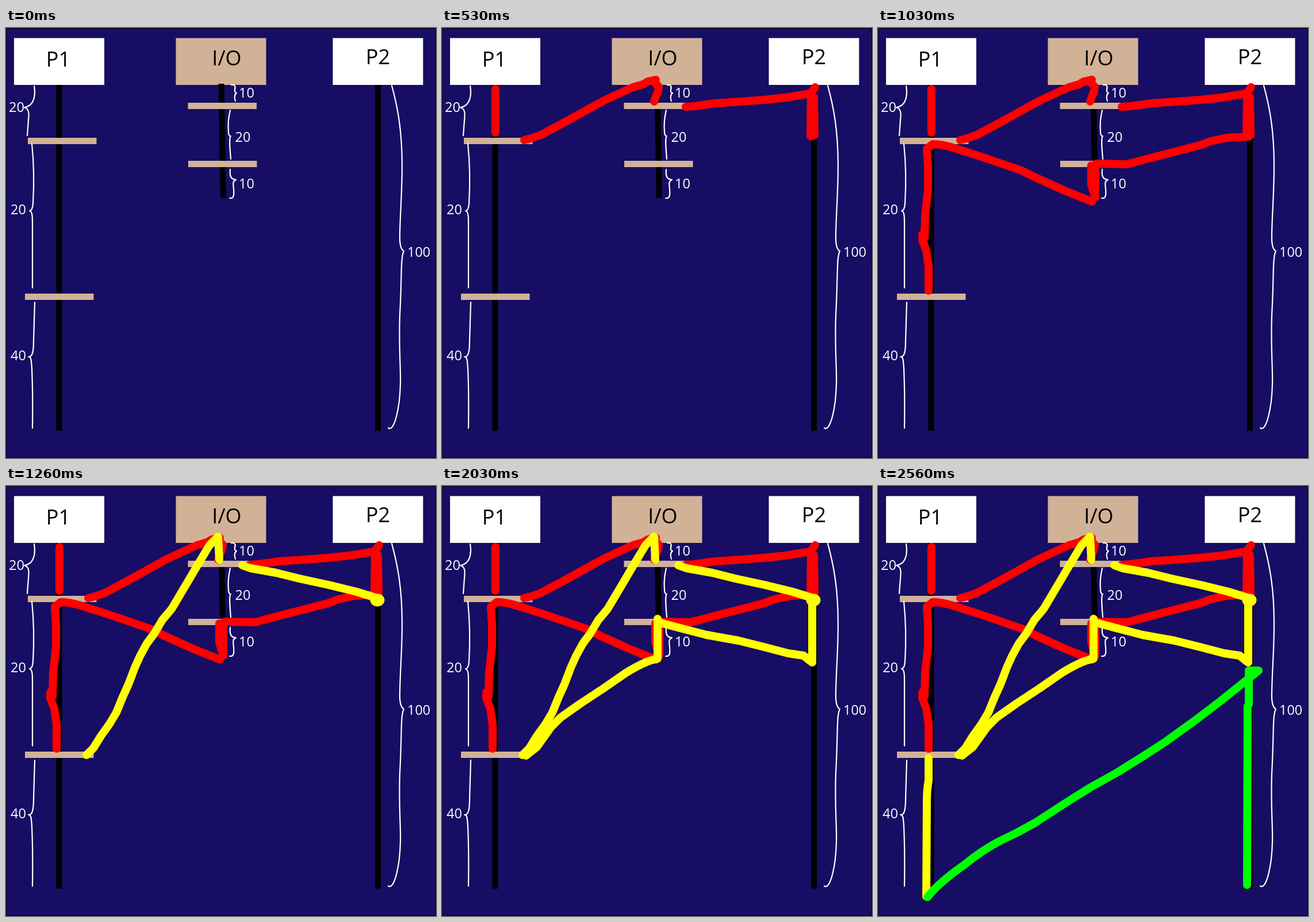
An HTML page with a canvas that plays this animation: 748x748 px, repeating every 2.96 s.

```html
<!DOCTYPE html>
<html lang="en">
<head>
<meta charset="utf-8">
<title>Process timeline</title>
<style>
  html, body { margin: 0; width: 100%; height: 100%; overflow: hidden; background: #170d64; }
  canvas { display: block; width: 748px; height: 748px; }
</style>
</head>
<body>
<canvas id="stage" width="748" height="748"></canvas>
<script>
const ctx = document.getElementById('stage').getContext('2d');
const LOOP = 2960;
const NAVY = '#170d64', TAN = '#d1b297';
const RED = '#ff0000', YELLOW = '#ffff00', GREEN = '#00ff00';
const FONT = '"Open Sans", "Noto Sans", sans-serif';

const boxes = [
  { x: 14, fill: '#fff', label: 'P1', cx: 91, base: 67 },
  { x: 295.5, fill: TAN, label: 'I/O', cx: 384, base: 65 },
  { x: 568.5, fill: '#fff', label: 'P2', cx: 647, base: 63 },
];

const bars = [[38, 191], [33, 462], [316.5, 130], [317, 231]];

const lifelines = ['M92.5 99V700.5', 'M374.5 97L378 295.5', 'M647 99V700.5'];

const braces = [
  'M49 101C52 119 48 136 32 138C41 141 40 150 39 160L37 187',
  'M45 201C49 240 49 270 47 305Q46 318 41 318C46 319 46 329 46 340V452',
  'M50 477L48 545C48 562 46 573 39 572C44 571 44 580 45 592Q47 640 46 696',
  'M392 99C398 98 400 102 398 107Q397 112 401 113C397 116 397 121 399 127',
  'M390 143C386 160 386 170 387 180Q387 188 391 188C388 190 389 205 391 228',
  'M390 246C389 258 391 263 400 264C394 267 395 270 396 280C397 292 396 297 389 296',
  'M671 100C682 140 689 180 689 240C689 290 685 330 685 365Q685 384 692 388C686 400 689 430 685 500C683 560 687 590 686 620C685 660 676 702 665 696',
];

const notes = [
  ['20', 5, 145.5], ['20', 8, 324], ['40', 8, 578], ['10', 405, 120.5],
  ['20', 398.5, 197.5], ['10', 405, 279], ['100', 698, 398],
];

// Brush strokes in drawing order: appearance time, colour, path.
const strokes = [
  [130, RED, 'M93 106V182'],
  [260, RED, 'M143 195L155 192 172 186 215 163 280 127 332 103 350 98 358 93 372 90'],
  [260, RED, 'M372 97L377 102 376 109 369 128'],
  [360, RED, 'M424 137L440 136 475 131 520 128 560 125 598 121 641 114 649 103'],
  [530, RED, 'M642 115L641 188 648 186 647 120'],
  [700, RED, 'M645 189L607 191 578 197 560 204 490 222 433 237 380 236'],
  [770, RED, 'M371 239V272L378 295V240'],
  [830, RED, 'M372 302L325 283 274 260 250 248 215 236 180 224 127 207Q109 202 95 202L85 210'],
  [900, RED, 'M85 212L87 240V280L82 325 81 365'],
  [930, RED, 'M77 359V369L84 387 88 415V457'],
  [1130, YELLOW, 'M140 468L152 456 165 435 180 414 192 394 203 367 213 345 224 316 233 296 245 274 257 258 272 233 288 214 313 172 333 138 354 103 369 88L371 128'],
  [1260, YELLOW, 'M411 138L425 143 470 151 510 161 561 172 610 184 642 194'],
  [1430, YELLOW, 'M651 198L644 202V307'],
  [1600, YELLOW, 'M380 238L410 246 460 259 516 269 560 280 602 291 629 295 640 304'],
  [1830, YELLOW, 'M375 231V300'],
  [2030, YELLOW, 'M374 301Q356 303 320 325L281 352 240 379 206 403 190 419 175 440 165 454 146 469'],
  [2300, YELLOW, 'M88 473V512Q85 530 85 545L84 714'],
  [2530, GREEN, 'M86 715Q107 689 150 659Q182 633 213 617L240 604 273 586 330 549 370 524 415 499 460 471 500 445 550 409 596 374 662 321H645V380'],
  [2560, GREEN, 'M643 383L642 694'],
].map(([at, color, path]) => ({ at, color, path: new Path2D(path) }));

function line(path, color, width, cap = 'round') {
  ctx.strokeStyle = color;
  ctx.lineWidth = width;
  ctx.lineCap = cap;
  ctx.lineJoin = 'round';
  ctx.stroke(path instanceof Path2D ? path : new Path2D(path));
}

function text(str, x, y, size, color, align) {
  ctx.font = `${size}px ${FONT}`;
  ctx.fillStyle = color;
  ctx.textAlign = align;
  ctx.fillText(str, x, y);
}

function drawDiagram() {
  ctx.fillStyle = NAVY;
  ctx.fillRect(0, 0, 748, 748);
  ctx.strokeStyle = '#000';
  ctx.lineWidth = 1;
  ctx.strokeRect(0.5, 0.5, 747, 747);

  for (const { x, fill, label, cx, base } of boxes) {
    ctx.fillStyle = fill;
    ctx.fillRect(x, 17.5, 157, 81.5);
    text(label, cx, base, 36, '#000', 'center');
  }
  lifelines.forEach(p => line(p, '#000', 10, 'butt'));
  ctx.fillStyle = TAN;
  bars.forEach(([x, y]) => ctx.fillRect(x, y, 119.5, 11));
  braces.forEach(p => line(p, '#fff', 2.2));
  notes.forEach(([str, x, y]) => text(str, x, y, 23.5, '#fff', 'left'));
}

function draw(now) {
  const t = now % LOOP;
  drawDiagram();
  for (const s of strokes) {
    if (t >= s.at) line(s.path, s.color, 14);
  }
  if (t >= 1260) {
    ctx.fillStyle = YELLOW;
    ctx.beginPath();
    ctx.ellipse(646, 198.5, 12.5, 11, 0, 0, Math.PI * 2);
    ctx.fill();
  }
}

const start = performance.now();
function tick() {
  draw(performance.now() - start);
  requestAnimationFrame(tick);
}
tick();
</script>
</body>
</html>
```
